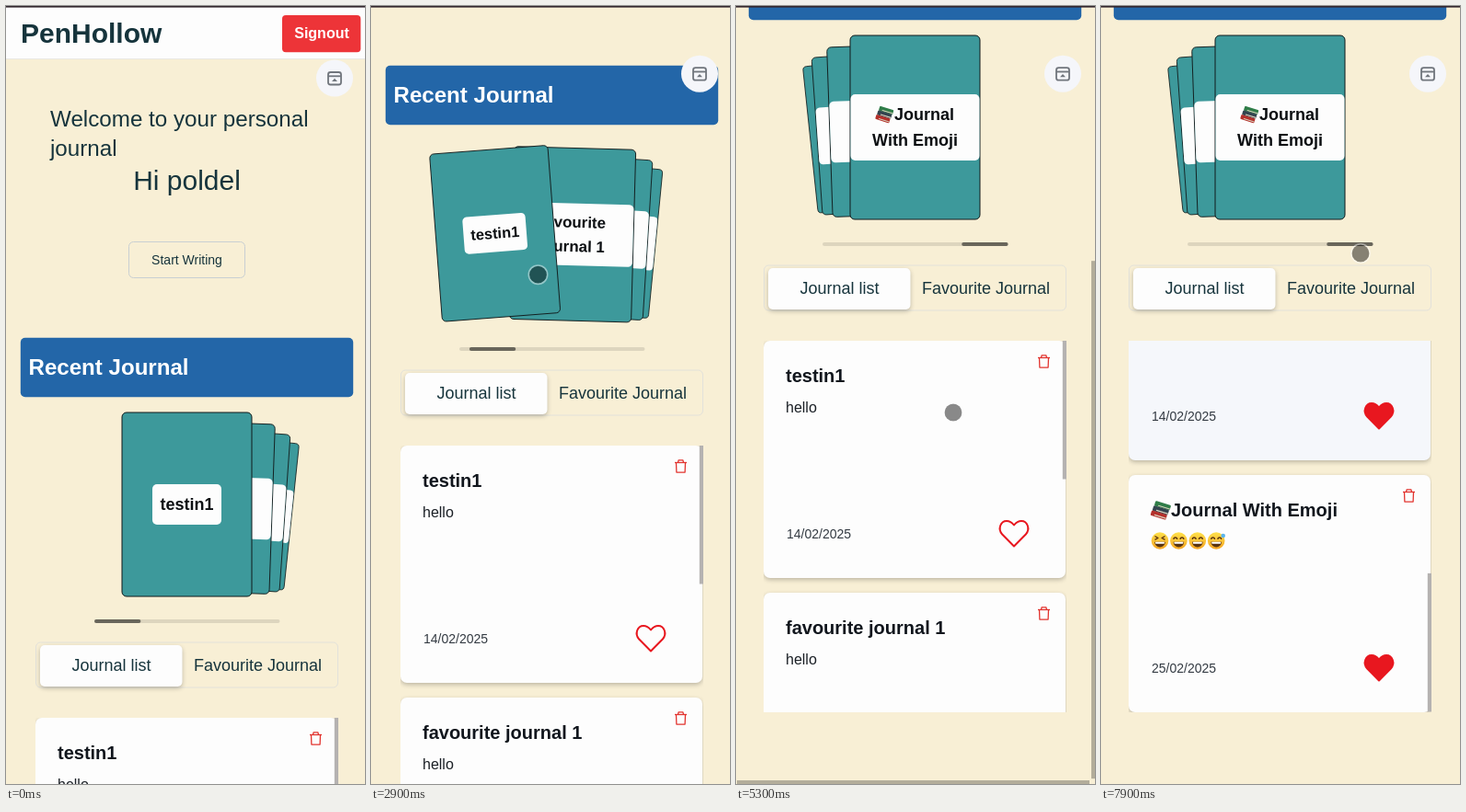
An HTML page with a canvas for the animation above (8 s loop, 390 by 846 pixels).

```html
<!DOCTYPE html>
<html lang="en">
<head>
<meta charset="utf-8">
<title>Journal app</title>
<style>
html, body { margin: 0; width: 100%; height: 100%; overflow: hidden; background: #f8efd5; }
canvas { display: block; width: 390px; height: 846px; }
</style>
</head>
<body>
<canvas id="stage"></canvas>
<script>
const W = 390, H = 846, LOOP = 8000;
const FONT = '"Liberation Sans", Arial, sans-serif';
const INK = '#16343c', PAPER = '#fdfdfd', BEIGE = '#f8efd5', RED = '#e8171f';

const canvas = document.getElementById('stage');
const c = canvas.getContext('2d');
const dpr = window.devicePixelRatio || 1;
canvas.width = W * dpr;
canvas.height = H * dpr;

const journals = [
  { title: 'testin1', label: ['testin1'], body: 'hello', date: '14/02/2025' },
  { title: 'favourite journal 1', label: ['favourite', 'journal 1'], body: 'hello', date: '14/02/2025' },
  { title: 'favourite journal 2', label: ['favourite', 'journal 2'], body: 'testing', date: '14/02/2025' },
  { title: 'Journal With Emoji', label: ['Journal', 'With Emoji'], emoji: true, date: '25/02/2025' }
];

// Keyframe tracks: [time, value, ...]
const SCROLL = [[900, 0], [1200, 125], [1500, 242], [1700, 283], [1900, 296], [4800, 296], [5100, 410]];
const LIST = [[5600, 0], [5850, 303], [5950, 400], [6050, 450], [6100, 461], [7300, 461], [7520, 676]];
const PAN = [[3050, 0], [3200, 2]];
const BARS = [[900, 0], [1000, 1], [2100, 1], [2300, 0], [3050, 0], [3150, 1], [3700, 1], [3900, 0],
  [4800, 0], [4900, 1], [5500, 1], [5700, 0]];
const POINTER = [[350, 402, 610], [700, 263, 564], [900, 263, 564], [1200, 263, 439], [1500, 263, 322],
  [1900, 264, 290], [2763, 266, 291], [3003, 119, 293], [3350, 266, 305], [3590, 119, 308],
  [3900, 305, 320], [4140, 158, 322], [4400, 201, 323], [4500, 201, 323], [4800, 236, 556],
  [5100, 236, 442], [5400, 236, 442], [5600, 245, 620], [5850, 250, 317], [6200, 250, 317],
  [6700, 302, 660], [7100, 302, 660], [7300, 300, 560], [7600, 282, 269]];
const SWIPES = [2763, 3350, 3900];
const DRAG = 240, SETTLE = 300, PULL = 0.375, LIKED_AT = 6900;

// Card deck: slide size, pivot below the book's middle
const SLIDE_W = 394, SLIDE_H = 60, PIVOT = 38, DECK_X = 196.5, DECK_Y = 542;

const lerp = (a, b, k) => a + (b - a) * k;
const clamp01 = v => Math.max(0, Math.min(1, v));

function track(keys, t) {
  if (t <= keys[0][0]) return keys[0].slice(1);
  for (let i = 1; i < keys.length; i++) {
    const a = keys[i - 1], b = keys[i];
    if (t < b[0]) {
      const k = (t - a[0]) / (b[0] - a[0]);
      return a.slice(1).map((v, j) => lerp(v, b[j + 1], k));
    }
  }
  return keys[keys.length - 1].slice(1);
}

// CSS "ease": cubic-bezier(.25, .1, .25, 1)
function ease(x) {
  if (x <= 0) return 0;
  if (x >= 1) return 1;
  let lo = 0, hi = 1;
  for (let i = 0; i < 20; i++) {
    const u = (lo + hi) / 2, v = 1 - u;
    if (0.75 * v * u + u * u * u < x) lo = u; else hi = u;
  }
  return 0.3 * lo * (1 - lo) ** 2 + 3 * lo * lo * (1 - lo) + lo ** 3;
}

function text(str, x, y, size, color = INK, weight = 'normal', align = 'left') {
  c.font = `${weight} ${size}px ${FONT}`;
  c.fillStyle = color;
  c.textAlign = align;
  c.fillText(str, x, y);
}

function box(x, y, w, h, r, fill, stroke) {
  c.beginPath();
  c.roundRect(x, y, w, h, r);
  if (fill) { c.fillStyle = fill; c.fill(); }
  if (stroke) { c.strokeStyle = stroke; c.lineWidth = 1; c.stroke(); }
}

function raised(x, y, w, h, r, fill) {
  c.save();
  c.shadowColor = 'rgba(0,0,0,.24)';
  c.shadowBlur = 5 * dpr;
  c.shadowOffsetY = 2 * dpr;
  box(x, y, w, h, r, fill);
  c.restore();
}

function dot(x, y, r, fill) {
  c.beginPath();
  c.arc(x, y, r, 0, Math.PI * 2);
  c.fillStyle = fill;
  c.fill();
}

function line(color, width, ...pts) {
  c.beginPath();
  pts.forEach(([x, y], i) => i ? c.lineTo(x, y) : c.moveTo(x, y));
  c.strokeStyle = color;
  c.lineWidth = width;
  c.stroke();
}

function books(x, base, size) {
  c.save();
  c.translate(x + size * 0.53, base - size * 0.33);
  c.scale(size / 20, size / 20);
  c.rotate(0.3);
  [['#2f7d48', -8, -8.5], ['#33444f', -8.5, -3], ['#b3302b', -9, 2.5]].forEach(([color, bx, by]) => {
    box(bx, by, 17.5, 5.8, 1.2, color);
    box(bx + 4, by + 3.6, 13.5, 1.2, 0.4, '#d9cfbb');
  });
  c.restore();
}

function face(x, y, kind) {
  const brown = '#5b3410';
  const g = c.createLinearGradient(0, y - 9, 0, y + 9);
  g.addColorStop(0, '#ffe04a');
  g.addColorStop(1, '#f5a623');
  dot(x, y, 9.3, g);
  for (const s of [-1, 1]) {
    if (kind === 0) {
      line(brown, 1.3, [x + s * 5.5, y - 5], [x + s * 2, y - 3], [x + s * 5.5, y - 1.2]);
    } else {
      c.beginPath();
      c.arc(x + s * 3.6, y - 1.6, 1.9, Math.PI, 0);
      c.strokeStyle = brown;
      c.lineWidth = 1.3;
      c.stroke();
    }
  }
  c.beginPath();
  c.arc(x, y + 1.2, 5.8, 0, Math.PI);
  c.closePath();
  c.fillStyle = brown;
  c.fill();
  box(x - 5, y + 1.3, 10, 2, 0.8, '#fff');
  if (kind === 3) dot(x + 7.5, y - 5.5, 2.3, '#5ab4ee');
}

function heart(x, y, filled) {
  c.beginPath();
  c.moveTo(x, y + 14);
  c.lineTo(x - 12.8, y + 1);
  c.bezierCurveTo(x - 18, y - 5, x - 14.5, y - 13.5, x - 8, y - 13.5);
  c.bezierCurveTo(x - 4, y - 13.5, x - 2, y - 11.5, x, y - 9);
  c.bezierCurveTo(x + 2, y - 11.5, x + 4, y - 13.5, x + 8, y - 13.5);
  c.bezierCurveTo(x + 14.5, y - 13.5, x + 18, y - 5, x + 12.8, y + 1);
  c.closePath();
  c.lineJoin = 'round';
  c.lineWidth = 2;
  c.strokeStyle = RED;
  c.stroke();
  if (filled) { c.fillStyle = RED; c.fill(); }
}

function trash(x, y) {
  const col = '#e2342f';
  line(col, 1.3, [x - 6.5, y - 4], [x + 6.5, y - 4]);
  line(col, 1.3, [x - 3, y - 4], [x - 2.4, y - 6.6], [x + 2.4, y - 6.6], [x + 3, y - 4]);
  line(col, 1.3, [x - 5, y - 4], [x - 4.6, y + 6.6], [x + 4.6, y + 6.6], [x + 5, y - 4]);
}

// Pose of a stacked book at signed distance p from the front
function pose(p, swiping) {
  const a = Math.abs(p);
  let add = 8 - a * 0.75, rot = -2 * p, scale = 1, y = 0;
  if (swiping && p > 0 && p < 1) {
    const sub = Math.sqrt(1 - Math.abs((a - 0.5) / 0.5));
    rot -= 28 * p * sub;
    scale = 1 - 0.5 * sub * p;
    add += 96 * sub;
    y = -0.25 * sub * a * SLIDE_H;
  }
  return [-add * p / 100 * SLIDE_W, y, 100 * a, rot, scale];
}

function deckState(t) {
  let n = 0;
  while (n < SWIPES.length && t >= SWIPES[n]) n++;
  if (!n) return { pos: 0, poses: journals.map((_, i) => pose(-i)) };
  const since = t - SWIPES[n - 1], from = n - 1;
  const pull = PULL * clamp01(since / DRAG);
  const k = ease((since - DRAG) / SETTLE);
  const poses = journals.map((_, i) => {
    const a = pose(from + pull - i, true), b = pose(n - i);
    return a.map((v, j) => lerp(v, b[j], k));
  });
  return { pos: lerp(from + pull, n, k), poses };
}

function book(j, [x, y, depth, rot, scale]) {
  const f = 1200 / (1200 + depth);
  c.save();
  c.translate(DECK_X + x * f, DECK_Y + PIVOT + y * f);
  c.rotate(rot * Math.PI / 180);
  c.scale(f * scale, f * scale);
  c.translate(0, -PIVOT);
  box(-70.5, -100, 141, 200, 5, '#3d999b', '#10191a');
  const two = j.label.length > 1;
  if (two) box(-70, -36, 140, 72, 5, PAPER);
  else box(-37.5, -22, 75, 44, 5, PAPER);
  j.label.forEach((s, i) => {
    const icon = j.emoji && i === 0;
    const base = (two ? -8 : 6) + i * 28;
    text(s, icon ? 10 : 0, base, 18, '#0c0f12', 'bold', 'center');
    if (icon) books(-43, base, 18);
  });
  c.restore();
}

function deck(t) {
  const { pos, poses } = deckState(t);
  journals.map((_, i) => i)
    .sort((a, b) => poses[b][2] - poses[a][2])
    .forEach(i => book(journals[i], poses[i]));
  box(96, 667, 201.5, 4, 2, 'rgba(0,0,0,.11)');
  box(96 + pos * 50.4, 667, 50.4, 4, 2, 'rgba(0,0,0,.52)');
}

function entry(j, i, y, t) {
  const liked = i === 3 || (i === 2 && t >= LIKED_AT);
  raised(32, y, 328, 258, 7, i === 2 && liked ? '#f5f7fb' : PAPER);
  text(j.title, j.emoji ? 78 : 56, y + 45, 20, '#11161d', 'bold');
  if (j.emoji) {
    books(56, y + 45, 20);
    for (let k = 0; k < 4; k++) face(66 + k * 20.4, y + 71.5, k);
  } else {
    text(j.body, 56, y + 78, 16, '#1b2026');
  }
  text(j.date, 57, y + 215, 14, '#333a42');
  heart(304, y + 209.5, liked);
  trash(336.5, y + 22.5);
}

function list(t) {
  const top = 774, h = 404, total = 1080;
  const [pos] = track(LIST, t);
  c.save();
  c.beginPath();
  c.rect(32, top, 329, h);
  c.clip();
  journals.forEach((j, i) => entry(j, i, top + i * 274 - pos, t));
  c.fillStyle = '#b5b2b1';
  c.fillRect(356.8, top + pos * h / total, 4.2, 150.5);
  c.restore();
}

function page(t) {
  c.fillStyle = PAPER;
  c.fillRect(-5, 0, W + 10, 57);
  c.fillStyle = '#e9e8e4';
  c.fillRect(-5, 57, W + 10, 1);
  text('PenHollow', 16, 40, 30, INK, 'bold');
  box(300, 10, 85.3, 40.3, 4, '#ed3438');
  text('Signout', 343, 35, 16, '#fff', 'bold', 'center');

  text('Welcome to your personal', 48, 131, 24.2);
  text('journal', 48, 163, 24.2);
  text('Hi poldel', 196.5, 200, 30, INK, 'normal', 'center');
  box(133.5, 256.5, 126, 39, 5, null, '#c9cfd2');
  text('Start Writing', 196.5, 281, 14, INK, 'normal', 'center');

  box(15.8, 360.7, 361.4, 64.6, 5, '#2366a8');
  text('Recent Journal', 24.5, 401, 24.1, '#fff', 'bold');
  deck(t);

  box(32.5, 692, 328, 49, 5, null, '#e2e1da');
  raised(37, 695, 154.5, 45, 5, PAPER);
  text('Journal list', 114.5, 723, 18, INK, 'normal', 'center');
  text('Favourite Journal', 273.5, 723, 18, INK, 'normal', 'center');
  list(t);
}

// Sticky: scrolls a little, then stays
function floatButton(scroll) {
  const y = Math.max(73.7, 78.5 - scroll), grey = '#70757c';
  dot(357, y, 20, '#f5f6fa');
  c.beginPath();
  c.roundRect(350, y - 6.5, 14, 13.5, 2.5);
  c.strokeStyle = grey;
  c.lineWidth = 1.8;
  c.stroke();
  line(grey, 1.8, [350, y - 2.2], [364, y - 2.2]);
  c.beginPath();
  c.moveTo(357, y + 0.3);
  c.lineTo(360, y + 3.5);
  c.lineTo(354, y + 3.5);
  c.fillStyle = grey;
  c.fill();
}

function pointer(x, y) {
  dot(x, y, 9.5, 'rgba(0,0,0,.46)');
  c.beginPath();
  c.arc(x, y, 10.2, 0, Math.PI * 2);
  c.strokeStyle = 'rgba(255,255,255,.45)';
  c.lineWidth = 1.6;
  c.stroke();
}

function draw(t) {
  const [scroll] = track(SCROLL, t), [pan] = track(PAN, t), [bars] = track(BARS, t);
  c.setTransform(dpr, 0, 0, dpr, 0, 0);
  c.fillStyle = BEIGE;
  c.fillRect(0, 0, W, H);

  c.save();
  c.translate(-pan, -scroll);
  page(t);
  c.restore();

  c.save();
  c.translate(-pan, 0);
  floatButton(scroll);
  c.restore();

  if (bars > 0) {
    c.fillStyle = `rgba(0,0,0,${0.28 * bars})`;
    c.fillRect(386, scroll * 0.676, 4, 563);
    c.fillRect(pan / 2, 842, 383, 4);
  }
  c.fillStyle = '#33272e';
  c.fillRect(0, 0, W, 1.6);

  pointer(...track(POINTER, t));
}

const start = performance.now();
function tick() {
  draw((performance.now() - start) % LOOP);
  requestAnimationFrame(tick);
}
tick();
</script>
</body>
</html>
```
